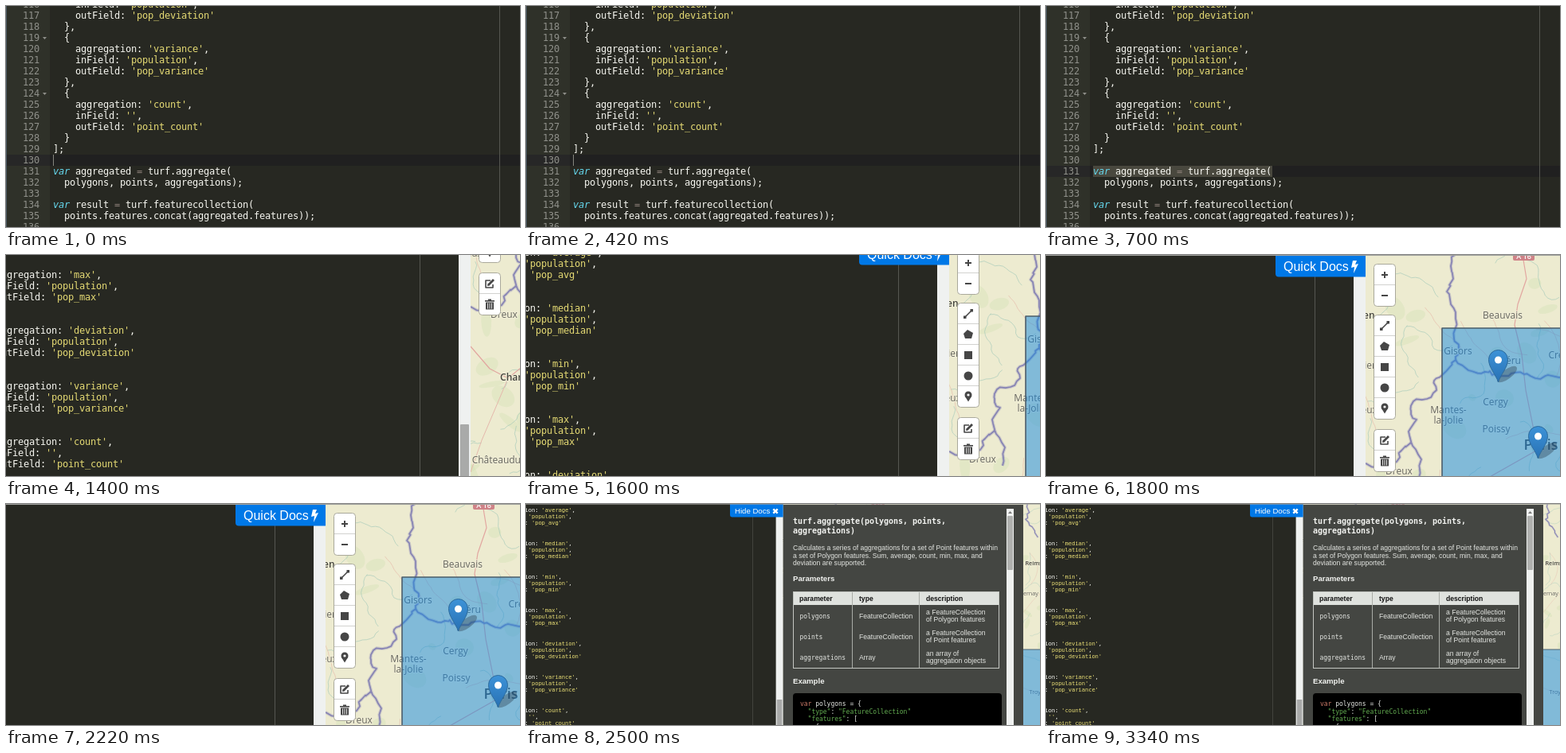
Recreate the animation shown at these times as an HTML page with a canvas. Size 645 px wide and 278 px high, loop 3.9 s.

```html
<!DOCTYPE html>
<html lang="en">
<head>
<meta charset="utf-8">
<title>Aggregate example</title>
<style>
html, body { margin: 0; width: 100%; height: 100%; overflow: hidden; background: #272822; }
canvas { display: block; width: 645px; height: 278px; }
</style>
</head>
<body>
<canvas id="stage" width="645" height="278"></canvas>
<script>
const ctx = document.getElementById('stage').getContext('2d');
const W = 645, H = 278, LOOP = 3900;
const MONO = '"DejaVu Sans Mono", monospace';
const SANS = '"Liberation Sans", Arial, sans-serif';
const MAP = '"Open Sans", "Noto Sans", sans-serif';

// Each view is a position of the page on the stage
const views = [
  { at: 0, x: 282, y: -308, zoom: 1, line: 130 },
  { at: 700, x: 282, y: -308, zoom: 1, line: 131, selected: true },
  { at: 1400, x: 182, y: -197, zoom: 1, line: 131 },
  { at: 1600, x: 130, y: -15, zoom: 1, line: 131 },
  { at: 1800, x: 0, y: 0, zoom: 1, line: 131 },
  { at: 2500, x: 82, y: 0, zoom: 0.6, line: 131, docs: true }
];

const code = buildCode();

function buildCode() {
  const lines = {};
  const kinds = ['average', 'median', 'min', 'max', 'deviation', 'variance', 'count'];
  kinds.forEach((kind, i) => {
    const n = 94 + i * 5, last = kind === 'count';
    const out = last ? 'point_count' : 'pop_' + (kind === 'average' ? 'avg' : kind);
    lines[n] = '  {';
    lines[n + 1] = `    aggregation: '${kind}',`;
    lines[n + 2] = `    inField: '${last ? '' : 'population'}',`;
    lines[n + 3] = `    outField: '${out}'`;
    lines[n + 4] = last ? '  }' : '  },';
  });
  lines[129] = '];';
  lines[131] = 'var aggregated = turf.aggregate(';
  lines[132] = '  polygons, points, aggregations);';
  lines[134] = 'var result = turf.featurecollection(';
  lines[135] = '  points.features.concat(aggregated.features));';
  return lines;
}

function rect(x, y, w, h, color) {
  ctx.fillStyle = color;
  ctx.fillRect(x, y, w, h);
}

function round(x, y, w, h, r, color) {
  ctx.beginPath();
  ctx.roundRect(x, y, w, h, r);
  ctx.fillStyle = color;
  ctx.fill();
}

function text(str, x, y, font, color, align = 'left') {
  ctx.font = font;
  ctx.fillStyle = color;
  ctx.textAlign = align;
  ctx.fillText(str, x, y);
}

// Monospaced text on a fixed character grid
function mono(str, x, y, font, color, cell) {
  ctx.font = font;
  ctx.letterSpacing = (cell - ctx.measureText('0').width) + 'px';
  text(str, x, y, font, color);
  ctx.letterSpacing = '0px';
}

function poly(points, color) {
  ctx.beginPath();
  points.forEach(p => ctx.lineTo(p[0], p[1]));
  ctx.closePath();
  ctx.fillStyle = color;
  ctx.fill();
}

function line(points, color, width) {
  ctx.beginPath();
  points.forEach(p => ctx.lineTo(p[0], p[1]));
  ctx.strokeStyle = color;
  ctx.lineWidth = width;
  ctx.stroke();
}

function disc(x, y, r, color) {
  ctx.beginPath();
  ctx.arc(x, y, r, 0, Math.PI * 2);
  ctx.fillStyle = color;
  ctx.fill();
}

function random(seed) {
  return () => (seed = (seed * 16807) % 2147483647) / 2147483647;
}

function drawCodeLine(str, x, y) {
  for (const m of str.matchAll(/'[^']*'|\bvar\b|=|[^'=v]+|v/g)) {
    const t = m[0];
    const color = t[0] === "'" ? '#e6db74' : t === 'var' ? '#66d9ef' : t === '=' ? '#8c7f78' : '#f8f8f2';
    const style = t === 'var' ? 'italic ' : '';
    mono(t, x + m.index * 7, y, `${style}12px ${MONO}`, color, 7);
  }
}

function drawEditor(view) {
  ctx.save();
  ctx.translate(-282, 308);
  rect(0, -308, 668, 700, '#272822');
  rect(0, -308, 55, 700, '#2f3129');
  rect(0, -308, 1, 700, '#4d5b66');
  const top = n => 187 + (n - 130) * 14;
  rect(1, top(view.line), 54, 14, '#272727');
  rect(55, top(view.line), 613, 14, '#202020');
  if (view.selected) rect(59, top(131), 225, 14, '#49483e');
  rect(619, -308, 1, 700, '#555651');
  for (let n = 94; n <= 136; n++) {
    const y = top(n) + 11;
    mono(String(n), 21, y, `12px ${MONO}`, '#8f908a', 7);
    if (/^ *\{/.test(code[n] || '')) poly([[46, y - 5], [51, y - 5], [48.5, y - 2]], '#8f908a');
    if (code[n]) drawCodeLine(code[n], 59, y);
  }
  if (view.line === 130) rect(59, top(130), 1, 14, '#85857e');
  ctx.restore();
  rect(386, 0, 15, 700, '#eff1f0');
  round(388, 410, 11, 90, 1, '#a9aaa9');
}

function drawButton(docs) {
  const x = docs ? 290 : 288;
  round(x, 0, 401 - x, 27.5, [0, 0, 0, 4], '#0078e7');
  text(docs ? 'Hide Docs' : 'Quick Docs', x + 10, 20, `16px ${SANS}`, '#fff');
  if (docs) {
    line([[380.5, 10.5], [389.5, 19.5]], '#fff', 4);
    line([[389.5, 10.5], [380.5, 19.5]], '#fff', 4);
  } else {
    poly([[385, 7], [390, 7], [388, 12], [392, 11], [386, 23], [387, 15], [383, 16]], '#fff');
  }
}

function border(points, seed) {
  const rnd = random(seed), out = [];
  points.forEach((p, i) => {
    const q = points[i + 1];
    if (!q) return out.push(p);
    for (let k = 0; k < 3; k++) {
      const j = () => k ? (rnd() - 0.5) * 5 : 0;
      out.push([p[0] + (q[0] - p[0]) * k / 3 + j(), p[1] + (q[1] - p[1]) * k / 3 + j()]);
    }
  });
  line(out, 'rgba(128,126,180,.3)', 4);
  line(out, '#8683b4', 1.7);
}

function label(str, x, y, size = 12, bold = false) {
  ctx.font = `${bold ? '600 ' : ''}${size}px ${MAP}`;
  ctx.textAlign = 'center';
  ctx.strokeStyle = 'rgba(240,238,215,.75)';
  ctx.lineWidth = 2.5;
  ctx.strokeText(str, x, y);
  text(str, x, y, ctx.font, bold ? '#45453f' : '#66665f', 'center');
}

function drawTerrain() {
  const rnd = random(4711);
  rect(401, 0, 620, 600, '#edebd0');
  for (let i = 0; i < 75; i++) {
    ctx.beginPath();
    ctx.ellipse(401 + rnd() * 560, rnd() * 500, 4 + rnd() * 17, 3 + rnd() * 10, rnd() * 3, 0, 7);
    ctx.fillStyle = 'rgba(203,221,173,.3)';
    ctx.fill();
  }
  for (let i = 0; i < 75; i++) {
    let x = 395 + rnd() * 560, y = rnd() * 500, a = rnd() * 6.3;
    const road = i % 3 === 0, path = [];
    for (let k = 0; k < 16; k++) {
      path.push([x, y]);
      a += (rnd() - 0.5) * (road ? 0.5 : 1.4);
      x += Math.cos(a) * 5;
      y += Math.sin(a) * 5;
    }
    line(path, road ? 'rgba(226,160,150,.55)' : 'rgba(158,199,184,.6)', road ? 0.8 : 1);
  }
  line([[598, 0], [603, 30], [592, 62], [588, 88], [597, 125], [602, 170], [617, 245]], '#e2a6a0', 1.2);
  line([[401, 312], [425, 340], [448, 352], [475, 330], [520, 300], [617, 245]], '#e2a6a0', 1.2);
  line([[448, 352], [432, 390], [415, 430], [401, 470]], '#e5b8ac', 1);
}

function pin(x, y) {
  ctx.save();
  ctx.translate(x, y);
  ctx.beginPath();
  ctx.ellipse(11, -10, 15, 6, -0.65, 0, 7);
  ctx.fillStyle = 'rgba(35,50,65,.35)';
  ctx.fill();
  const g = ctx.createLinearGradient(0, -41, 0, 0);
  g.addColorStop(0, '#3d93d8');
  g.addColorStop(1, '#2871b4');
  ctx.beginPath();
  ctx.moveTo(0, 0);
  ctx.bezierCurveTo(-3, -10, -12, -18, -12, -28.5);
  ctx.arc(0, -28.5, 12, Math.PI, 0);
  ctx.bezierCurveTo(12, -18, 3, -10, 0, 0);
  ctx.fillStyle = g;
  ctx.fill();
  ctx.strokeStyle = '#2d6b9c';
  ctx.lineWidth = 1;
  ctx.stroke();
  disc(0, -28, 4.5, '#fff');
  ctx.restore();
}

function area(x, y, w, h) {
  rect(x, y, w, h, 'rgba(23,138,226,.5)');
  ctx.strokeStyle = '#4b5d6b';
  ctx.lineWidth = 1.6;
  ctx.strokeRect(x, y, w, h);
}

const ink = '#464646';
const icons = {
  plus() { rect(-4, -1, 8, 2, ink); rect(-1, -4, 2, 8, ink); },
  minus() { rect(-4, -1, 8, 2, ink); },
  line() {
    line([[-4, 4], [4, -4]], ink, 1.6);
    rect(-6, 2.5, 3.5, 3.5, ink);
    rect(2.5, -6, 3.5, 3.5, ink);
  },
  pentagon() { poly([[-1, -6], [6, -2], [4, 5], [-4, 5], [-6, -1]], ink); },
  square() { rect(-5, -5, 10, 10, ink); },
  circle() { disc(0, 0, 5.5, ink); },
  marker() {
    disc(0, -2, 4.5, ink);
    poly([[-4.3, -0.5], [4.3, -0.5], [0, 6.5]], ink);
    disc(0, -2, 1.6, '#fff');
  },
  edit() {
    line([[1, -4], [-5, -4], [-5, 5], [4, 5], [4, 1]], ink, 1.6);
    line([[-1.5, 1.5], [5, -5]], ink, 2.8);
    poly([[-3, 3], [-2.5, 0], [0, 2.5]], ink);
  },
  trash() {
    rect(-6, -5, 12, 1.6, ink);
    rect(-2, -6.5, 4, 1.5, ink);
    rect(-5, -2.5, 10, 9, ink);
    [-3, -0.5, 2].forEach(x => rect(x, -1.5, 1, 7, '#ddd'));
  }
};

function toolbar(y, names) {
  const h = names.length * 26;
  ctx.beginPath();
  ctx.roundRect(411.5, y - 0.5, 27, h + 1, 4);
  ctx.fillStyle = '#fff';
  ctx.fill();
  ctx.strokeStyle = '#aaa99b';
  ctx.lineWidth = 1;
  ctx.stroke();
  names.forEach((name, i) => {
    if (i) rect(412, y + i * 26 - 1, 26, 1, '#d2d2cf');
    ctx.save();
    ctx.translate(425, y + i * 26 + 13);
    icons[name]();
    ctx.restore();
  });
}

function drawMap() {
  ctx.save();
  ctx.beginPath();
  ctx.rect(401, 0, 620, 600);
  ctx.clip();
  ctx.lineJoin = 'round';
  drawTerrain();
  border([[513, 0], [508, 14], [511, 30], [503, 46], [508, 62], [514, 80], [512, 105], [518, 118],
    [514, 132], [505, 143], [496, 152], [487, 158], [490, 170], [478, 181], [461, 184], [458, 196],
    [465, 207], [455, 222], [460, 240], [471, 257], [468, 280]], 31);
  border([[514, 132], [530, 145], [546, 149], [557, 146], [568, 154], [584, 149], [600, 150],
    [614, 155], [630, 151], [660, 156]], 57);
  border([[458, 236], [446, 246], [440, 260], [424, 268], [401, 262]], 83);
  border([[912, 0], [916, 18], [908, 32], [922, 48], [934, 70]], 19);
  label('Rouen', 394, 80, 12, true);
  label('Louviers', 396, 143);
  label('Évreux', 397, 199);
  label('Beauvais', 573, 80);
  label('Gisors', 517, 125);
  label('Méru', 581, 137);
  label('Creil', 643, 130);
  label('Cergy', 564, 189);
  label('Mantes-', 505, 199);
  label('la-Jolie', 505, 212);
  label('Poissy', 565, 223);
  label('Paris', 621, 245, 18, true);
  label('Dreux', 443, 276);
  label('Chartres', 463, 355, 12, true);
  label('Châteaudun', 437, 459);
  label('Reims', 925, 129, 12, true);
  label('Épernay', 912, 192);
  label('Troyes', 934, 398);
  round(670 - 84, -4, 27, 11, 2, '#cf8388');
  text('A 16', 599.5, 5, `600 9px ${MAP}`, '#fff', 'center');
  area(497, 92, 270, 300);
  area(840, 305, 300, 300);
  pin(567.5, 160);
  pin(617.5, 256);
  toolbar(12, ['plus', 'minus']);
  toolbar(76, ['line', 'pentagon', 'square', 'circle', 'marker']);
  toolbar(220, ['edit', 'trash']);
  ctx.restore();
}

function drawDocs() {
  const pale = '#e4e6e2', body = `8.6px ${SANS}`, bold = `bold 8.6px ${SANS}`, head = `bold 9.6px ${SANS}`;
  rect(323, 1, 301, 277, '#444642');
  rect(603, 6, 9, 272, '#eff1f0');
  poly([[605, 12], [610, 12], [607.5, 9]], '#777');
  round(604, 15, 7, 68, 1, '#b0b1af');

  mono('turf.aggregate(polygons, points,', 335, 25, `bold 10px ${MONO}`, '#f2f3f0', 6);
  mono('aggregations)', 335, 37, `bold 10px ${MONO}`, '#f2f3f0', 6);
  ['Calculates a series of aggregations for a set of Point features within',
    'a set of Polygon features. Sum, average, count, min, max, and',
    'deviation are supported.'].forEach((s, i) => text(s, 335, 58 + i * 9.6, body, pale));
  text('Parameters', 335, 97, head, '#f2f3f0');

  rect(335, 110, 259, 17, '#dfe2de');
  ['parameter', 'type', 'description'].forEach((s, i) => text(s, [343, 418, 502][i], 122, bold, '#111'));
  [['polygons', 'FeatureCollection', 'a FeatureCollection', 'of Polygon features'],
    ['points', 'FeatureCollection', 'a FeatureCollection', 'of Point features'],
    ['aggregations', 'Array', 'an array of', 'aggregation objects']].forEach((row, i) => {
    const y = 144 + i * 26;
    mono(row[0], 343.5, y, `8px ${MONO}`, pale, 4.8);
    text(row[1], 418, y, body, pale);
    text(row[2], 502, y - 5.5, body, pale);
    text(row[3], 502, y + 4, body, pale);
  });
  ctx.strokeStyle = '#c4c7c2';
  ctx.lineWidth = 1;
  ctx.strokeRect(335.5, 110.5, 258, 96);
  rect(409, 111, 1, 95, '#a9aca7');
  rect(493, 111, 1, 95, '#a9aca7');

  text('Example', 335, 226, head, '#f2f3f0');
  round(335, 238, 262, 60, 4, '#000');
  const put = (s, col, row, color) =>
    mono(s, 344 + col * 4.8, 254 + row * 9.6, `8px ${MONO}`, color, 4.8);
  put('var', 0, 0, '#cc7a68');
  put('polygons = {', 4, 0, pale);
  put('"type"', 2, 1, '#62ab50');
  put(':', 8, 1, pale);
  put('"FeatureCollection"', 10, 1, '#62ab50');
  put('"features"', 2, 2, '#62ab50');
  put(': [', 12, 2, pale);
  put('{', 4, 3, pale);
}

function draw(view) {
  ctx.setTransform(1, 0, 0, 1, 0, 0);
  rect(0, 0, W, H, '#272822');
  ctx.setTransform(view.zoom, 0, 0, view.zoom, view.x, view.y);
  drawEditor(view);
  drawMap();
  drawButton(view.docs);
  rect(-282, 0, 1300, 1, '#a0a19d');
  ctx.setTransform(1, 0, 0, 1, 0, 0);
  if (view.docs) drawDocs();
}

let shown = null;
function tick() {
  const t = performance.now() % LOOP;
  const view = views.filter(v => v.at <= t).pop();
  if (view !== shown) draw(shown = view);
  requestAnimationFrame(tick);
}
tick();
</script>
</body>
</html>
```
